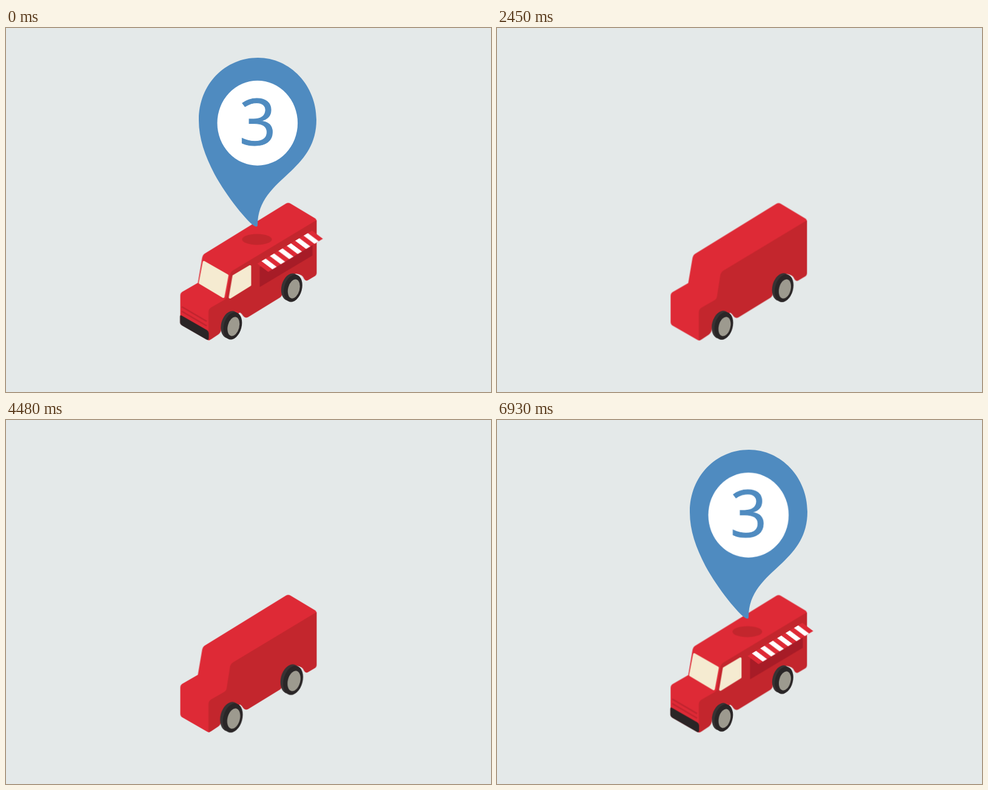
These frames come from a looping animation (800x600 px, 7 s). An HTML page without scripts:

```html
<!DOCTYPE html>
<html lang="en">
<head>
<meta charset="utf-8">
<title>Food truck pin</title>
<style>
html, body { margin: 0; width: 100%; height: 100%; overflow: hidden; background: #e4e9e9; }
svg { display: block; width: 100vw; height: 100vh; }

/* Each part is built in 3.5 s; the loop starts built, takes it apart, then rebuilds it. */
.part {
  animation: 3.5s ease-out infinite alternate-reverse both;
  transform-box: fill-box;
  transform-origin: center;
}
.body   { animation-name: body; transform-box: view-box; transform-origin: 446px 473px; }
.wheel  { animation-name: wheel; }
.trim   { animation-name: trim; }
.glass  { --over: 1.15; }
.bumper { --over: 1.5; }
.awning { animation-name: unfold; transform-origin: 0 0; }
.pin    { animation-name: pin; transform-box: view-box; transform-origin: 413px 327px; }
.dial   { animation-name: dial; transform-box: view-box; transform-origin: 415px 157px; }
.shake  { animation: shake .28s steps(1) infinite; }

@keyframes body {
  0%, 10% { transform: scale(0); }
  17% { transform: scale(1.18, 1.12); }
  20.5% { transform: scale(.96); }
  23%, 100% { transform: none; }
}
@keyframes wheel {
  0%, 22% { transform: scale(0); }
  26% { transform: scale(1.2); }
  29% { transform: scale(1.05); }
  31%, 100% { transform: none; }
}
@keyframes trim {
  0%, 32% { transform: scale(0); }
  37% { transform: scale(var(--over, 1)); }
  40% { transform: scale(.95); }
  43%, 100% { transform: none; }
}
@keyframes unfold {
  0%, 35% { transform: scaleY(0); }
  43%, 100% { transform: none; }
}
@keyframes pin {
  0%, 34% { transform: scale(0); }
  38.5% { transform: scale(1.14); }
  41% { transform: scale(.96); }
  43%, 100% { transform: none; }
}
@keyframes dial {
  0%, 38.5% { transform: scale(0); }
  42.5% { transform: scale(1.1); }
  45% { transform: scale(.98); }
  46.5%, 100% { transform: none; }
}
@keyframes shake {
  0% { transform: translate(.5px, 0); }
  25% { transform: translate(-.5px, 0); }
  50% { transform: translate(-.6px, .1px); }
  75%, 100% { transform: translate(-.6px, .4px); }
}
</style>
</head>
<body>
<svg viewBox="0 0 800 600">
  <defs>
    <g id="wheel">
      <ellipse cx="370" cy="489" rx="15" ry="23" transform="rotate(15 370 489)" fill="#383334"/>
      <ellipse cx="374" cy="491" rx="14.6" ry="23" transform="rotate(15 374 491)" fill="#2a2627"/>
      <ellipse cx="375.3" cy="492" rx="9.4" ry="16" transform="rotate(15 375.3 492)" fill="#9d9a8f"/>
    </g>
  </defs>

  <g class="shake">
    <g class="part body">
      <path fill="#de2a36" d="M461 289.500Q465 287 469 289.500L509 313.500Q512 315.500 512 319L500 380 345 500 335 515Q333 515 330 513L290 490Q287 488 287 484V441Q287 437 290 435L316 420 323 379Q324 374 327 372Z"/>
      <path fill="#c3262d" d="M512 317V403Q512 407 509 409L498 415.500Q494 418 491.500 414 489 406 478 405 460 408 456 432 456 441 452 444L399 476.500Q394 479 391 475 387 467 377 466.500 358 473 355 496 354 502 350 505L338 513Q334 516 333.500 511V469Q333.500 463 338 460.500L359 448.500Q363 446 363.500 442L369 407Q370 402 374 399.500L507 319.500Q511 317 512 317Z"/>
    </g>

    <ellipse class="part trim" cx="413.500" cy="348.500" rx="24.500" ry="9" fill="#c3262d"/>
    <g class="part trim" stroke="#c0252f" stroke-width="2.400">
      <path d="M289.500 459.500 330.500 483.500M289.500 467 330.500 491"/>
    </g>
    <path class="part trim bumper" fill="#2a2526" d="M286.500 476Q286.500 472 290 474.500L331 498Q334 500 334 503V511Q334 516 330 513.500L290 490.500Q286.500 488 286.500 485Z"/>
    <g fill="#f5ebd1" stroke="#f5ebd1" stroke-width="4" stroke-linejoin="round">
      <path class="part trim glass" d="M326 386 364.500 408 358 443 319.500 420Z"/>
      <path class="part trim glass" d="M402 393V423.500L369 444 375 409Z"/>
    </g>
    <path class="part trim" fill="#a71c27" d="M418 394 505 342V375L418 427Z"/>
    <g transform="matrix(6.95 -4.2 18 13.5 414 388.5)">
      <g class="part awning">
        <path fill="#de2a36" d="M0 0H13V1H0Z"/>
        <path stroke="#fff" stroke-dasharray="1" d="M1 .5H12"/>
      </g>
    </g>
  </g>

  <g class="part wheel"><use href="#wheel"/></g>
  <g class="part wheel"><use href="#wheel" x="99.500" y="-62"/></g>

  <g class="part pin">
    <path fill="#4f8bc0" d="M411 327C400 322 364 278 344 241 328 210 318 182 318 152 318 92 362 49 415.500 49 469 49 512 95 512 151 512 190 494 213 470 236 441 263 415 284 415 325Q415 328.500 411 327Z"/>
    <g class="part dial">
      <ellipse cx="414.800" cy="156.700" rx="66.300" ry="70" fill="#fff"/>
      <text x="415" y="192.500" text-anchor="middle" font-family="'Open Sans', 'Noto Sans', sans-serif" font-size="107" fill="#4f8bc0" stroke="#4f8bc0">3</text>
    </g>
  </g>
</svg>
</body>
</html>
```
